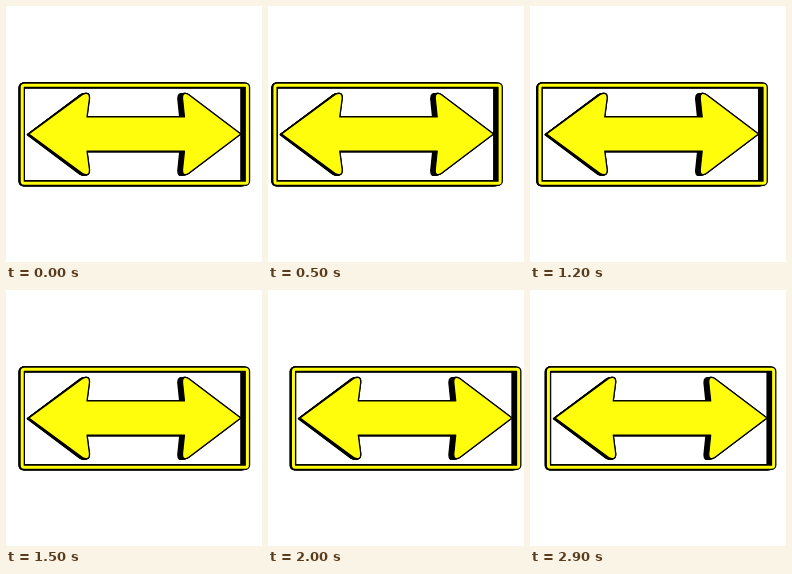
An HTML page that plays this animation: 256 by 256 pixels, repeating every 3000 ms.

```html
<!DOCTYPE html>
<html lang="en">
<head>
<meta charset="utf-8">
<title>Swaying arrow sign</title>
<style>
  html, body { margin: 0; width: 100%; height: 100%; overflow: hidden; background: #fff; }
  svg { display: block; width: 100%; height: 100%; }
</style>
</head>
<body>
<svg viewBox="0 0 256 256">
  <defs>
    <rect id="frame" x="16.2" y="79.2" width="225.2" height="98" rx="2" fill="none"/>
    <path id="arrow" stroke-linejoin="round" d="M22.8 128 L76.5 88.5 Q83.5 85 83.5 92 L81 111 H178.5
      L176.5 92 Q176.5 85 182.5 88.5 L234.8 128 L182.5 167.5 Q176.5 171 176.5 164 L178.5 145
      H81 L83.5 164 Q83.5 171 76.5 167.5Z"/>
  </defs>
  <g id="sign"></g>
</svg>
<script>
  const LOOP = 3000, STEP = 100, SWAY = 10.7, LAYERS = 6;
  const BLACK = '#000', YELLOW = '#fffd0c';
  const sign = document.getElementById('sign');
  const parts = [];

  function add(shape, depth, drop, style) {
    const node = document.createElementNS('http://www.w3.org/2000/svg', 'use');
    node.setAttribute('href', '#' + shape);
    for (const key in style) node.setAttribute(key, style[key]);
    sign.appendChild(node);
    parts.push({ node, depth, drop });
  }

  // Black sides recede behind the yellow face.
  function extrude(shape, depth, drop, style) {
    for (let i = LAYERS; i >= 0; i--) {
      add(shape, depth * i / LAYERS, drop * i / LAYERS, style);
    }
  }

  extrude('frame', 1, 0.4, { stroke: BLACK, 'stroke-width': 5.6 });
  add('frame', 0, 0, { stroke: YELLOW, 'stroke-width': 3 });
  extrude('arrow', 1.35, 0.7, { fill: BLACK, stroke: BLACK, 'stroke-width': 1.4 });
  add('arrow', 0, 0, { fill: YELLOW, stroke: BLACK, 'stroke-width': 1.2 });

  function draw(time) {
    const t = Math.floor((time % LOOP) / STEP) * STEP;
    const shift = -SWAY * Math.sin(2 * Math.PI * t / LOOP);
    for (const { node, depth, drop } of parts) {
      node.setAttribute('transform',
        `translate(${-0.8 * depth} ${drop}) scale(${1 - 0.015 * depth} 1) translate(${shift} 0)`);
    }
  }

  const start = performance.now();
  function tick() {
    draw(performance.now() - start);
    requestAnimationFrame(tick);
  }
  tick();
</script>
</body>
</html>
```
